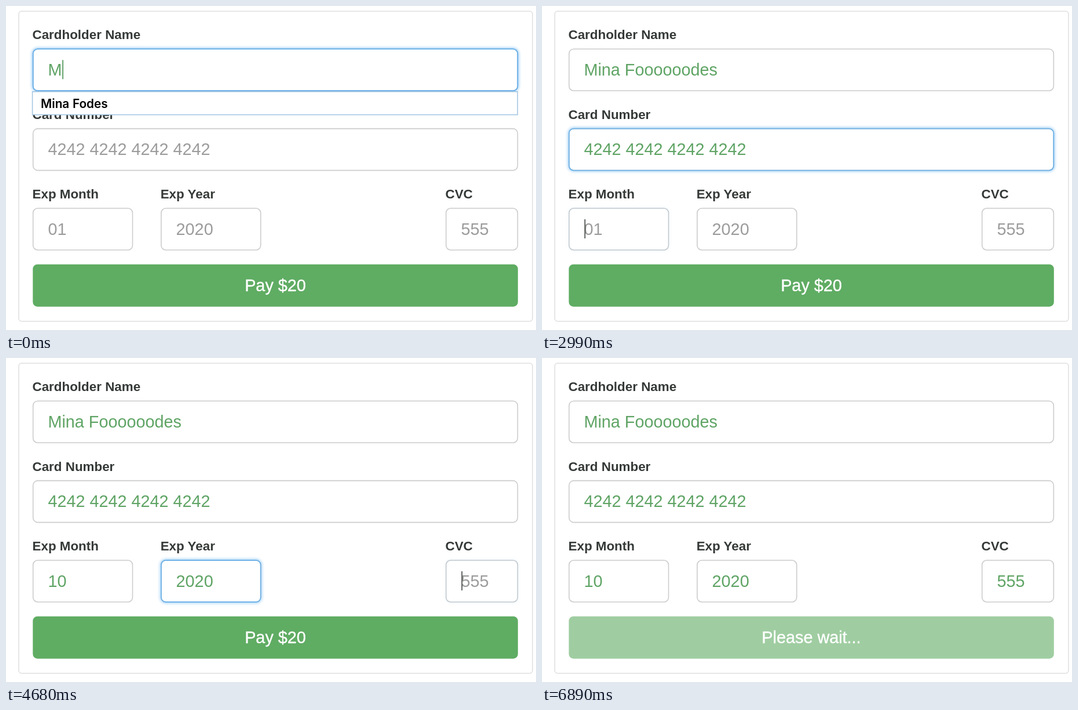
Write an HTML page that moves like this. It is 915 px wide and 559 px high and loops after 7280 ms.

```html
<!DOCTYPE html>
<html lang="en">
<head>
<meta charset="utf-8">
<title>Payment form</title>
<style>
  html, body { margin: 0; width: 100%; height: 100%; overflow: hidden; background: #fff; }
  svg { display: block; width: 915px; height: 559px; }
  text { font: 28.8px "Liberation Sans", Arial, sans-serif; white-space: pre; }
  .label { font-size: 22.4px; font-weight: bold; fill: #353a37; }
  .item { font: 600 20.8px Inter, sans-serif; font-variant-numeric: tabular-nums; fill: #000; }
  .pay { fill: #fff; stroke: #fff; stroke-width: .4; text-anchor: middle; }
  .menu rect { fill: #fff; stroke: #a4c6e2; stroke-width: 1.6; }
</style>
</head>
<body>
<svg id="stage" viewBox="0 0 915 559">
  <defs>
    <filter id="blur" filterUnits="userSpaceOnUse" x="0" y="0" width="915" height="559">
      <feGaussianBlur stdDeviation="2"/>
    </filter>
  </defs>
</svg>
<script>
const STEP = 130, LOOP = 7280, WAIT_AT = 6240;
const GREEN = '#5fac63', TEXT_GREEN = '#5fa465';
const stage = document.getElementById('stage');

function add(tag, attrs, parent = stage, content = '') {
  const node = document.createElementNS('http://www.w3.org/2000/svg', tag);
  set(node, attrs);
  node.textContent = content;
  parent.append(node);
  return node;
}
function set(node, attrs) {
  for (const key in attrs) node.setAttribute(key, attrs[key]);
}
const box = (x, y, width, height, rx, more, parent) =>
  add('rect', { x, y, width, height, rx, fill: 'none', ...more }, parent);
const show = (node, visible) => set(node, { visibility: visible ? 'visible' : 'hidden' });
const keys = (start, count) => Array.from({ length: count }, (_, i) => start + i * STEP);
const clamp = v => Math.max(0, Math.min(1, v));
const fade = elapsed => elapsed < 0 ? 0 : clamp((elapsed + 20) / 220);

const fields = [
  { label: 'Cardholder Name', x: 46.7, y: 74.2, w: 836.6, text: 'Mina Foooooodes', hint: '',
    focus: -1000, keys: [...keys(0, 6), ...keys(910, 6), ...keys(1820, 3)], caret: '#4f9556' },
  { label: 'Card Number', x: 46.7, y: 211.6, w: 836.6, text: '4242 4242 4242 4242', hint: '4242 4242 4242 4242',
    focus: 2340, keys: keys(2470, 4), chunk: 5 },
  { label: 'Exp Month', x: 46.7, y: 349, w: 171.8, text: '10', hint: '01',
    focus: 2990, keys: keys(3770, 2) },
  { label: 'Exp Year', x: 267.9, y: 349, w: 171.8, text: '2020', hint: '2020',
    focus: 4030, keys: keys(4160, 4) },
  { label: 'CVC', x: 759.7, y: 349, w: 123.6, text: '555', hint: '555',
    focus: 4680, keys: keys(5070, 3) }
];
const BUTTON_FOCUS = 5590;

box(22, 9, 887, 535, 5, { stroke: '#e0e0e0', 'stroke-width': 1.5 });

fields.forEach((f, i) => {
  f.blur = i + 1 < fields.length ? fields[i + 1].focus : BUTTON_FOCUS;
  add('text', { class: 'label', x: f.x - 1.2, y: f.y - 17 }, stage, f.label);
  f.glow = box(f.x, f.y, f.w, 72, 8, { stroke: '#8cc6f5', 'stroke-width': 5, filter: 'url(#blur)' });
  box(f.x, f.y, f.w, 72, 8, { fill: '#fff', stroke: '#ccc', 'stroke-width': 1.6 });
  f.edge = box(f.x, f.y, f.w, 72, 8, { stroke: '#66afe9', 'stroke-width': 1.8 });
  f.value = add('text', { x: f.x + 25.7, y: f.y + 45.7 });
  f.cursor = add('rect', { y: f.y + 19, width: 1.7, height: 33, fill: f.caret || '#4a4f4b' });
});

const button = add('g', {});
const buttonFill = box(46.3, 445.7, 837.5, 73, 8, { fill: GREEN }, button);
const ring = add('g', {}, button);
box(45, 444.3, 840, 75.6, 8, { stroke: '#6fb2fb', 'stroke-width': 4.5, opacity: .65 }, ring);
box(47, 446.4, 836, 71.6, 7, { stroke: '#2f83bb', 'stroke-width': 2 }, ring);
const payText = add('text', { class: 'pay', x: 465, y: 492 }, button);

function menu(y, width, height, rows) {
  const group = add('g', { class: 'menu' });
  box(45.6, y, width, height, 0, {}, group);
  rows.forEach((row, i) => add('text', { class: 'item', x: 60, y: y + 28.6 + i * 38.4 }, group, row));
  return group;
}
const nameMenu = menu(147.8, 837.6, 39.8, ['Mina Fodes']);
const monthMenu = menu(422.4, 173, 78.2, ['10', '12']);

function drawField(f, t) {
  const pressed = f.keys.filter(k => k <= t);
  const typed = f.text.slice(0, pressed.length * (f.chunk || 1));
  const level = fade(t - f.focus) - fade(t - f.blur);
  set(f.glow, { opacity: level * .8 });
  set(f.edge, { opacity: level });
  f.value.textContent = typed || f.hint;
  set(f.value, { fill: typed ? TEXT_GREEN : '#9c9c9c' });

  const active = t >= f.focus && t < f.blur;
  const lastInput = pressed.length ? pressed[pressed.length - 1] : f.focus;
  show(f.cursor, active && (t - lastInput) % 1040 < 520);
  const end = typed ? f.value.getComputedTextLength() : 0;
  set(f.cursor, { x: f.x + 26.6 + end });
}

function draw(time) {
  const t = Math.floor((time % LOOP) / STEP) * STEP;
  fields.forEach(f => drawField(f, t));
  show(nameMenu, t < 1040);
  show(monthMenu, t >= 3770 && t < 3900);

  const waiting = fade(t - WAIT_AT);
  payText.textContent = t < WAIT_AT ? 'Pay $20' : 'Please wait...';
  set(buttonFill, { opacity: 1 - .4 * waiting });
  set(ring, { opacity: fade(t - BUTTON_FOCUS) - waiting });
}

let start;
function tick(now) {
  start ??= now;
  draw(now - start);
  requestAnimationFrame(tick);
}
draw(0);
requestAnimationFrame(tick);
</script>
</body>
</html>
```
